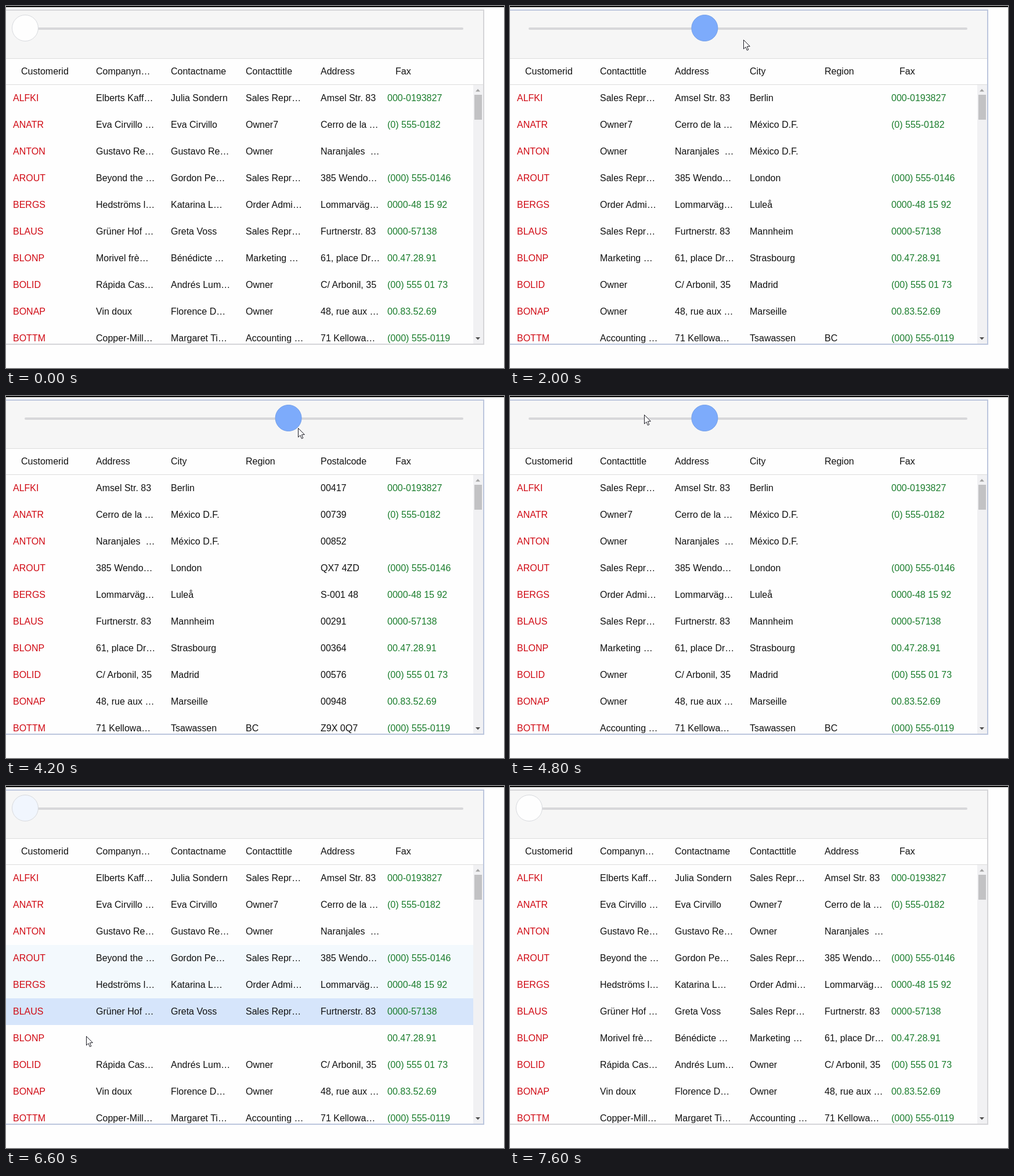
Write an HTML page with a canvas that moves like this. It is 858x624 px and loops after 7800 ms.

```html
<!DOCTYPE html>
<html lang="en">
<head>
<meta charset="utf-8">
<title>Grid column slider</title>
<style>
html, body { margin: 0; width: 858px; height: 624px; overflow: hidden; background: #fefefe; }
canvas { display: block; }
</style>
</head>
<body>
<canvas id="stage" width="858" height="624"></canvas>
<script>
const ctx = document.getElementById('stage').getContext('2d');
const LOOP = 7800, STEP = 200, ENTER = 200, RELEASE = 6000, IDLE = 7600;
const ROW_TOP = 136, ROW_H = 46;
const TRACK_X = 33, TRACK_Y = 38, NOTCH = 151.2;
const CELLS = 4, CELL_X = 155, CELL_W = 129;

const headers = ['Companyn…', 'Contactname', 'Contacttitle', 'Address', 'City', 'Region', 'Postalcode', 'Country'];

// id | company | contact | title | address | city | region | postal code | country | fax
const rows = `
ALFKI|Elberts Kaff…|Julia Sondern|Sales Repr…|Amsel Str. 83|Berlin||00417|Germany|000-0193827
ANATR|Eva Cirvillo …|Eva Cirvillo|Owner7|Cerro de la …|México D.F.||00739|Mexico|(0) 555-0182
ANTON|Gustavo Re…|Gustavo Re…|Owner|Naranjales  …|México D.F.||00852|Mexico|
AROUT|Beyond the …|Gordon Pe…|Sales Repr…|385 Wendo…|London||QX7 4ZD|UK|(000) 555-0146
BERGS|Hedströms l…|Katarina L…|Order Admi…|Lommarväg…|Luleå||S-001 48|Sweden|0000-48 15 92
BLAUS|Grüner Hof …|Greta Voss|Sales Repr…|Furtnerstr. 83|Mannheim||00291|Germany|0000-57138
BLONP|Morivel frè…|Bénédicte …|Marketing …|61, place Dr…|Strasbourg||00364|France|00.47.28.91
BOLID|Rápida Cas…|Andrés Lum…|Owner|C/ Arbonil, 35|Madrid||00576|Spain|(00) 555 01 73
BONAP|Vin doux|Florence D…|Owner|48, rue aux …|Marseille||00948|France|00.83.52.69
BOTTM|Copper-Mill…|Margaret Ti…|Accounting …|71 Kellowa…|Tsawassen|BC|Z9X 0Q7|Canada|(000) 555-0119
`.trim().split('\n').map(line => line.split('|'));

// Turning points of the pointer: [time, x, y]
const path = [
  [ENTER, 0, 52], [1000, 173, 42], [2000, 402, 58], [3400, 561, 61], [3800, 594, 62], [4000, 594, 62],
  [4800, 231, 32], [5600, 20, 40], [RELEASE, 20, 40], [6600, 138, 431], [7200, 180, 640]
];

function pointerAt(t) {
  const i = path.findIndex(key => key[0] > t);
  if (i < 1) return null;
  const [t0, x0, y0] = path[i - 1], [t1, x1, y1] = path[i];
  const k = (t - t0) / (t1 - t0);
  return { x: Math.round(x0 + (x1 - x0) * k), y: Math.round(y0 + (y1 - y0) * k) };
}

// The knob trails the dragging pointer slightly and snaps to the nearest notch.
function sliderAt(t) {
  const drag = pointerAt(Math.min(t - 100, RELEASE));
  return drag ? Math.max(0, Math.round((drag.x - TRACK_X) / NOTCH)) : 0;
}

function box(color, x, y, w, h) {
  ctx.fillStyle = color;
  ctx.fillRect(x, y, w, h);
}

function text(str, x, y, color = '#111') {
  ctx.fillStyle = color;
  ctx.fillText(str, x, y);
}

function polygon(points, color) {
  ctx.fillStyle = color;
  ctx.beginPath();
  points.forEach(([x, y]) => ctx.lineTo(x, y));
  ctx.closePath();
  ctx.fill();
}

function drawSlider(value, active) {
  box('#f6f6f6', 0, 8, 822, 82);
  ctx.fillStyle = '#d7d7da';
  ctx.beginPath();
  ctx.roundRect(32, TRACK_Y - 1, 756, 4, 2);
  ctx.fill();
  ctx.beginPath();
  ctx.arc(TRACK_X + value * NOTCH, TRACK_Y, 22.5, 0, 7);
  ctx.fillStyle = value ? '#7dabfb' : active ? '#f1f6fe' : '#fefefe';
  ctx.fill();
  ctx.lineWidth = 1;
  ctx.strokeStyle = value ? '#739fe9' : '#d8dade';
  ctx.stroke();
}

function drawCells(list, first, y) {
  for (let i = 0; i < CELLS; i++) text(list[first + i], CELL_X + i * CELL_W, y);
}

function drawHeader(value) {
  box('#dcdcdc', 0, 90, 822, 1);
  box('#dcdcdc', 0, 135, 822, 1);
  text('Customerid', 26, 118);
  drawCells(headers, value, 118);
  text('Fax', 671, 118);
}

// The row under the pointer is still repainting; the highlight fades over the rows above it.
function drawRows(value, under) {
  ctx.save();
  ctx.beginPath();
  ctx.rect(0, ROW_TOP, 805, 446);
  ctx.clip();
  rows.forEach((row, r) => {
    const y = ROW_TOP + r * ROW_H, behind = under - r;
    if (behind > 0 && behind < 4) box(behind > 1 ? '#f3f9fd' : '#d6e5fb', 0, y, 805, ROW_H);
    text(row[0], 12, y + 28, '#d00a14');
    if (behind) drawCells(row, 1 + value, y + 28);
    text(row.at(-1), 657, y + 28, '#1a7d2c');
  });
  ctx.restore();
}

function drawScrollbar() {
  box('#f1f1f3', 805, 136, 17, 446);
  box('#c2c2c4', 807, 153, 13, 43);
  polygon([[809, 147.5], [817, 147.5], [813, 143]], '#a3a3a3');
  polygon([[809, 571], [817, 571], [813, 575.5]], '#505050');
}

function drawFrame(color) {
  box(color, 0, 6, 824, 2);
  box(color, 822, 6, 2, 578);
  box(color, 0, 582, 824, 2);
}

function drawPointer({ x, y }) {
  const arrow = [[0.5, 0.5], [0.5, 16], [4, 12.7], [6.4, 18.4], [8.8, 17.4], [6.4, 11.8], [11.3, 11.5]];
  ctx.save();
  ctx.translate(x, y);
  polygon(arrow, '#fff');
  ctx.strokeStyle = '#1c1c24';
  ctx.lineWidth = 1;
  ctx.stroke();
  ctx.restore();
}

function draw(now) {
  const t = Math.floor(now % LOOP / STEP) * STEP;
  const value = sliderAt(t), pointer = pointerAt(t);
  const active = t >= ENTER && t < IDLE;
  const under = pointer ? Math.floor((pointer.y - ROW_TOP) / ROW_H) : -1;

  box('#fefefe', 0, 0, 858, 624);
  box('#000', 0, 0, 858, 2);
  ctx.font = '16px "Liberation Sans", Arial, sans-serif';
  ctx.textRendering = 'optimizeLegibility';
  drawSlider(value, active);
  drawHeader(value);
  drawRows(value, under);
  drawScrollbar();
  drawFrame(active ? '#bcc6dd' : '#d5d5d8');
  if (pointer) drawPointer(pointer);
  requestAnimationFrame(draw);
}
requestAnimationFrame(draw);
</script>
</body>
</html>
```
